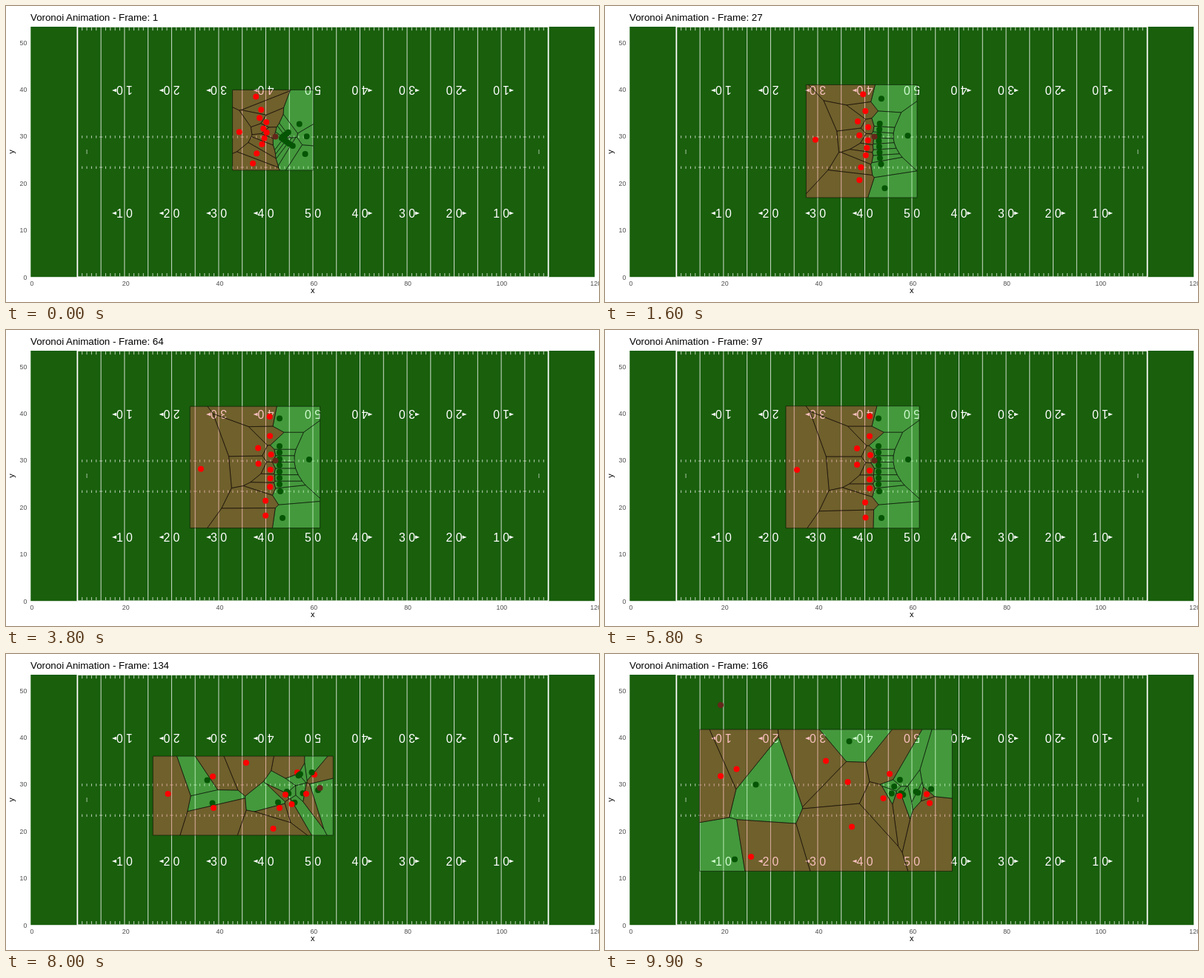
Recreate the animation shown at these times as an HTML page. Size 800 by 400 pixels, loop 10 s.

```html
<!DOCTYPE html>
<html lang="en">
<head>
<meta charset="utf-8">
<title>Voronoi Animation</title>
<style>
  html, body { margin: 0; width: 100%; height: 100%; overflow: hidden; background: #fff; }
  svg { display: block; width: 800px; height: 400px; font-family: "Liberation Sans", Arial, sans-serif; }
</style>
</head>
<body>
<svg id="stage" viewBox="0 0 800 400">
  <rect x="33.3" y="28" width="760.9" height="338.2" fill="#195f0c"/>
  <g id="field"></g>
  <g id="cells" stroke="#000" stroke-opacity=".75" stroke-width=".7" stroke-linejoin="round"></g>
  <g id="dots"></g>
  <g id="axes" font-size="8.8" fill="#4d4d4d"></g>
  <text id="title" x="33" y="20" font-size="13.3"></text>
  <text x="413.7" y="388" font-size="11" text-anchor="middle">x</text>
  <text transform="translate(10.5 197) rotate(-90)" font-size="11" text-anchor="middle">y</text>
</svg>
<script>
const $ = id => document.getElementById(id);
const add = (parent, tag, attrs, text) => {
  const node = document.createElementNS('http://www.w3.org/2000/svg', tag);
  for (const key in attrs) node.setAttribute(key, attrs[key]);
  if (text !== undefined) node.textContent = text;
  return parent.appendChild(node);
};
const lerp = (a, b, u) => a + (b - a) * u;
const mix = (p, q, u, v = u) => [lerp(p[0], q[0], u), lerp(p[1], q[1], v)];
const X = yards => 414 + (yards - 60) * 6.353;
const Y = yards => 366.2 - yards * 6.341;

function drawField() {
  const field = $('field');
  const line = (x1, y1, x2, y2, width, opacity) => add(field, 'line',
    { x1, y1, x2, y2, stroke: '#fff', 'stroke-width': width, 'stroke-opacity': opacity });
  for (const y of [28, 366.2]) line(X(10), y, X(110), y, 1.4, 1);
  for (let yard = 10; yard <= 110; yard++) {
    const x = X(yard), goal = yard % 100 === 10;
    if (yard % 5 === 0) {
      line(x, 28, x, 366.2, goal ? 1.8 : 1, goal ? 1 : 0.8);
      if (!goal) for (const y of [177, 218]) line(x - 2.2, y, x + 2.2, y, 0.9, 0.7);
    } else {
      for (const y of [29, 361]) line(x, y, x, y + 4.2, 0.9, 0.8);
      for (const y of [175.2, 216.6]) line(x, y, x, y + 3.4, 0.9, 0.8);
    }
  }
  for (const yard of [12, 108]) line(X(yard), 194, X(yard), 200, 0.9, 0.7);

  for (let yard = 20; yard <= 100; yard += 10) {
    const x = X(yard), side = Math.sign(yard - 60);
    const label = Math.min(yard - 10, 110 - yard) / 10 + ' 0';
    const attrs = { 'text-anchor': 'middle', 'font-size': 15.8, fill: '#fff' };
    add(field, 'text', { ...attrs, x, y: 286.3 }, label);
    add(field, 'text', { ...attrs, transform: `translate(${x} 108.3) rotate(180)` }, label);
    if (side) for (const y of [280, 114]) {
      const base = x + side * 11;
      add(field, 'path', { d: `M${base} ${y - 2.2}V${y + 2.2}L${base + side * 6} ${y}Z`, fill: '#fff' });
    }
  }
}

function drawAxes() {
  for (let v = 0; v <= 120; v += 20)
    add($('axes'), 'text', { x: 34.9 + v * 6.34, y: 378, 'text-anchor': 'middle' }, v);
  for (let v = 0; v <= 50; v += 10)
    add($('axes'), 'text', { x: 28.3, y: Y(v) + 3.5, 'text-anchor': 'end' }, v);
}

const SET = 5800, SNAP = 6400, THROW = 8000, END = 9900, LOOP = 10000, STEP = 100;
const MIDDLE = 181;

// A team's huddle is its formation squeezed together, with the wings folded back.
const red = {
  cell: '#f0625c', dot: '#f00', pace: 2.5,
  huddle: ([x, y]) => [354 + (x - 357) * 0.38 - Math.abs(y - MIDDLE) * 0.26, 165 + (y - MIDDLE) * 0.66]
};
const green = {
  cell: '#84f084', dot: '#055505', pace: 6,
  huddle: ([x, y]) => [372 + (x - 370) * 0.8 + Math.abs(y - MIDDLE) * 0.4, 178 + (y - MIDDLE) * 0.3]
};

// Runners have a spot in the formation, one at the throw and one at the end.
const runner = (team, set, thrown, end) => ({ team, set, thrown, end });
// Blockers stand on the line and stay at an angle to one opponent, ending a gap away.
const blocker = (place, man, angle, gap) =>
  ({ team: green, set: [369, 157 + place * 8.6], man, angle: angle * Math.PI / 180, gap });

const upperEdge = runner(red, [357, 143.5], [416, 163], [438, 201.5]);
const upperTackle = runner(red, [358, 169], [393, 160], [384, 162]);
const blitzer = runner(red, [340, 182], [377, 190], [397.5, 192]);
const lowerTackle = runner(red, [357, 190], [405, 189], [434, 189.5]);
const lowerEdge = runner(red, [357, 202], [385.5, 203], [375.5, 195]);

const players = [
  upperEdge, upperTackle,
  runner(green, [369, 119.5], [271.5, 170.5], [203.5, 176.5]),
  runner(green, [370, 218], [367, 200.5], [329.5, 118]),
  runner(green, [373, 254], [278.5, 201.5], [175, 277.5]),
  runner(green, [409, 175], [421, 184], [440, 182.5]),
  blocker(0, upperEdge, 220, 24),
  blocker(1, upperTackle, 70, 18),
  blocker(2, upperTackle, 30, 16),
  blocker(3, blitzer, -65, 4),
  blocker(4, blitzer, -20, 5),
  blocker(5, lowerTackle, 190, 12),
  blocker(6, lowerEdge, -30, 13),
  blitzer, lowerTackle, lowerEdge,
  runner(red, [357, 116.5], [279, 165.5], [177.5, 155.5]),
  runner(red, [340, 160], [324, 147], [298, 144.5]),
  runner(red, [259, 189], [218.5, 189], [156, 165]),
  runner(red, [357, 214], [369, 208], [327.5, 173]),
  runner(red, [351, 233], [360.5, 236], [333, 233.5]),
  runner(red, [351.5, 253.5], [280, 208], [197, 274])
];
const ball = { set: [363.5, 176.5], thrown: [423.5, 181], end: [156, 69] };

const rush = ms => Math.max(0, (ms - SNAP) / (THROW - SNAP)) ** 1.2;
const flight = ms => (ms - THROW) / (END - THROW);

// After the throw runners slow down along the field and speed up across it.
function afterThrow(player, u) {
  if (!player.man) return mix(player.thrown, player.end, 1 - (1 - u) ** 1.6, u ** 1.5);
  const [x, y] = afterThrow(player.man, u), gap = lerp(4.5, player.gap, u ** 3);
  return [x + gap * Math.cos(player.angle), y + gap * Math.sin(player.angle)];
}

function playerAt(player, ms) {
  const { team, set } = player;
  if (ms < SNAP) return mix(team.huddle(set), set, 1 - (1 - Math.min(1, ms / SET)) ** team.pace);
  if (ms < THROW) return mix(set, afterThrow(player, 0), rush(ms));
  return afterThrow(player, flight(ms));
}

const ballAt = ms => ms < THROW
  ? mix(ball.set, ball.thrown, rush(ms))
  : mix(ball.thrown, ball.end, flight(ms));

// The players' bounding box, widened by a tenth on every side.
function boundary(points) {
  const range = axis => {
    const values = points.map(p => p[axis]);
    const low = Math.min(...values), high = Math.max(...values), margin = (high - low) / 10;
    return [low - margin, high + margin];
  };
  const [left, right] = range(0), [top, bottom] = range(1);
  return [[left, top], [right, top], [right, bottom], [left, bottom]];
}

// Keeps the part of a polygon that is nearer to p than to q.
function clipNearer(polygon, p, q) {
  const dx = q[0] - p[0], dy = q[1] - p[1];
  const side = v => (v[0] - (p[0] + q[0]) / 2) * dx + (v[1] - (p[1] + q[1]) / 2) * dy;
  return polygon.flatMap((a, i) => {
    const b = polygon[(i + 1) % polygon.length], sa = side(a), sb = side(b);
    const kept = sa <= 0 ? [a] : [];
    if ((sa <= 0) !== (sb <= 0)) kept.push(mix(a, b, sa / (sa - sb)));
    return kept;
  });
}

drawField();
drawAxes();
const cells = players.map(({ team }) => add($('cells'), 'polygon', { fill: team.cell, 'fill-opacity': 0.4 }));
const addDot = fill => add($('dots'), 'circle', { r: 4, fill });
const dots = players.map(({ team }) => addDot(team.dot));
const ballDot = addDot('#64281a');

function place(dot, [x, y]) {
  dot.setAttribute('cx', x);
  dot.setAttribute('cy', y);
}

function render(step) {
  const ms = step * STEP;
  const points = players.map(player => playerAt(player, ms));
  const box = boundary(points);
  points.forEach((p, i) => {
    const cell = points.reduce((shape, q) => q === p ? shape : clipNearer(shape, p, q), box);
    cells[i].setAttribute('points', cell.map(v => v.map(c => c.toFixed(2)).join()).join(' '));
    place(dots[i], p);
  });
  place(ballDot, ballAt(ms));
  $('title').textContent = 'Voronoi Animation - Frame: ' + (Math.floor(step * 5 / 3) + 1);
}

const start = performance.now();
let shown = -1;
function tick() {
  const step = Math.floor((performance.now() - start) % LOOP / STEP);
  if (step !== shown) render(shown = step);
  requestAnimationFrame(tick);
}
tick();
</script>
</body>
</html>
```
